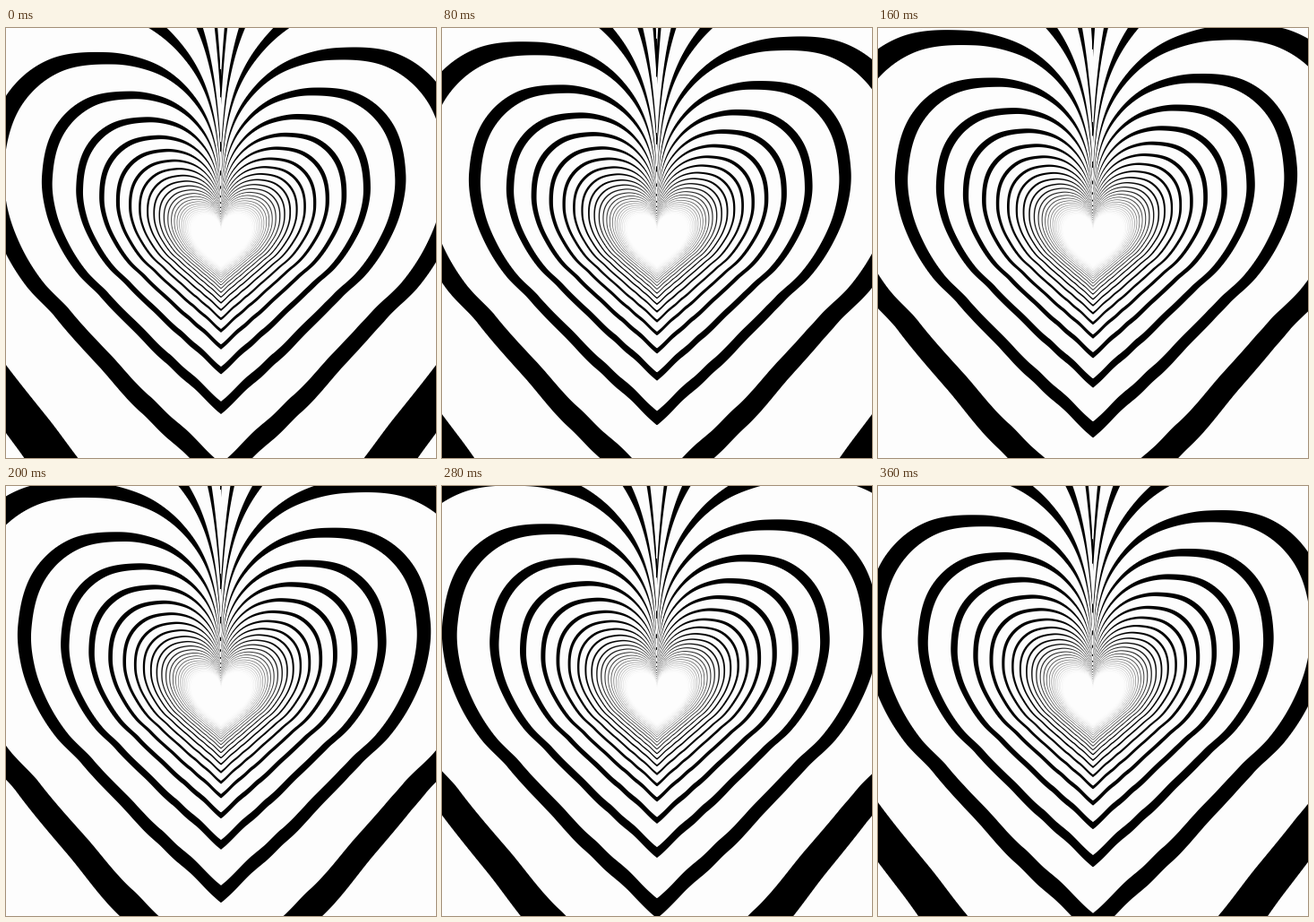
These frames come from a looping animation (480 by 480 pixels, 0.4 s). An HTML page with a canvas:

```html
<!DOCTYPE html>
<html lang="en">
<head>
<meta charset="utf-8">
<title>Heart tunnel</title>
<style>
  html, body { margin: 0; width: 100%; height: 100%; overflow: hidden; background: #fdfdfd; }
  canvas { display: block; width: 480px; height: 480px; }
</style>
</head>
<body>
<canvas id="stage" width="480" height="480"></canvas>
<script>
const SIZE = 480, MID = SIZE / 2;
const STEP = 40, STEPS = 10;
const EDGE = 0.293, DUTY = 0.263;
const PAPER = 253;

// Outline by angle from straight down: [degrees, reach, depth offset].
// A ring of depth z lies at radius reach / (z + offset).
const OUTLINE = [
  [0, 629, 0], [9, 556, 0.02], [17, 520, 0.04], [25, 495, 0.07],
  [45, 485, 0.21], [66, 540, 0.37], [78, 613, 0.45], [90, 701, 0.56],
  [100, 800, 0.74], [110.6, 906, 0.95], [125, 1016, 1.2], [137, 1030, 1.38],
  [149, 967, 1.6], [156, 905, 1.7], [162, 832, 1.77], [168, 730, 1.85],
  [173.5, 598, 1.92], [177, 455, 1.97], [180, 240, 2]
];

const clamp = v => Math.max(0, Math.min(1, v));
const smooth = v => { v = clamp(v); return v * v * (3 - 2 * v); };

function tangent(i, k) {
  const a = OUTLINE[Math.max(0, i - 1)];
  const b = OUTLINE[Math.min(OUTLINE.length - 1, i + 1)];
  return (b[k] - a[k]) / (b[0] - a[0]);
}

// Cubic Hermite through the outline points
function outline(deg, k) {
  let i = 0;
  while (i < OUTLINE.length - 2 && deg > OUTLINE[i + 1][0]) i++;
  const p = OUTLINE[i], q = OUTLINE[i + 1], span = q[0] - p[0];
  const t = (deg - p[0]) / span, t2 = t * t, t3 = t2 * t;
  return (2 * t3 - 3 * t2 + 1) * p[k] + (3 * t2 - 2 * t3) * q[k]
    + span * ((t3 - 2 * t2 + t) * tangent(i, k) + (t3 - t2) * tangent(i + 1, k));
}

function depthAt(x, y) {
  const r = Math.max(0.5, Math.hypot(x, y));
  const deg = Math.atan2(Math.abs(x), y) * 180 / Math.PI;
  // The right lobe is slightly fuller
  const swell = x > 0 && deg > 60 ? 1 + 0.033 * Math.sin((deg - 60) / 120 * Math.PI) : 1;
  return outline(deg, 1) * swell / r - outline(deg, 2);
}

const depth = new Float32Array(SIZE * SIZE);
const blur = new Float32Array(SIZE * SIZE);
const ink = new Float32Array(SIZE * SIZE);

for (let y = 0, i = 0; y < SIZE; y++) {
  for (let x = 0; x < SIZE; x++, i++) {
    depth[i] = depthAt(x + 0.5 - MID, y + 0.5 - MID);
  }
}

for (let y = 0, i = 0; y < SIZE; y++) {
  for (let x = 0; x < SIZE; x++, i++) {
    const dx = x < SIZE - 1 ? depth[i + 1] - depth[i] : depth[i] - depth[i - 1];
    const dy = y < SIZE - 1 ? depth[i + SIZE] - depth[i] : depth[i] - depth[i - SIZE];
    const r = Math.hypot(x + 0.5 - MID, y + 0.5 - MID);
    blur[i] = Math.max(1e-4, Math.hypot(dx, dy));
    ink[i] = smooth((26 - depth[i]) / 17) * clamp((r - 14) / 20);
  }
}

const ctx = document.getElementById("stage").getContext("2d");
const image = ctx.createImageData(SIZE, SIZE);
const pixels = new Uint32Array(image.data.buffer);

// Black length of the stripe pattern from 0 to u
function stripeSum(u) {
  const n = Math.floor(u);
  return n * DUTY + Math.min(u - n, DUTY);
}

function draw(step) {
  const shift = step / STEPS - EDGE;
  for (let i = 0; i < pixels.length; i++) {
    const u = depth[i] + shift, w = blur[i];
    const cover = (stripeSum(u + w / 2) - stripeSum(u - w / 2)) / w;
    const v = Math.round(PAPER * (1 - cover * ink[i]));
    pixels[i] = 0xff000000 | v << 16 | v << 8 | v;
  }
  ctx.putImageData(image, 0, 0);
}

const start = performance.now();
let shown = 0;
draw(0);

function tick() {
  const step = Math.floor((performance.now() - start) / STEP) % STEPS;
  if (step !== shown) draw(shown = step);
  requestAnimationFrame(tick);
}
requestAnimationFrame(tick);
</script>
</body>
</html>
```
